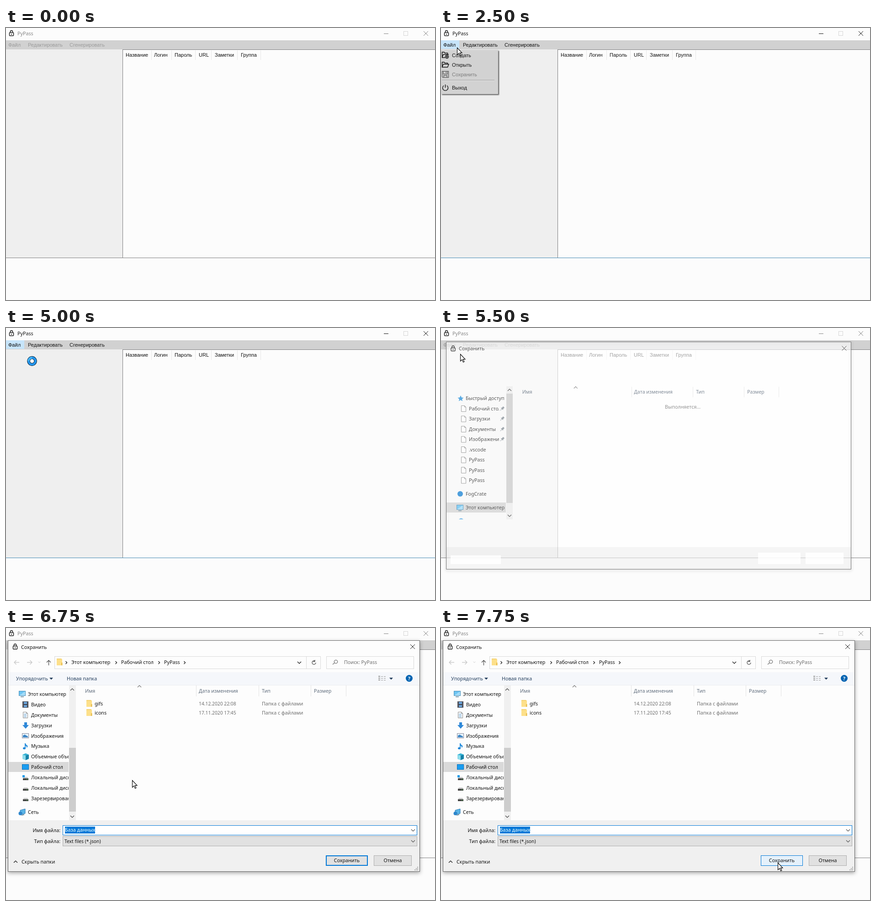
Recreate the animation shown at these times as an HTML page. Size 939 by 597 pixels, loop 8000 ms.

```html
<!DOCTYPE html>
<html lang="ru">
<head>
<meta charset="utf-8">
<title>PyPass</title>
<style>
html, body { margin: 0; width: 100%; height: 100%; overflow: hidden; background: #fcfcfc; }
svg { display: block; }
text { white-space: pre; fill: currentColor; }
.app { font: 11px "Liberation Sans", Arial, sans-serif; }
.ui { font: 10.7px "Noto Sans", "Open Sans", sans-serif; }
.tree { font-size: 10.5px; }
.latin { font-size: 10.3px; }
.line { fill: none; stroke: currentColor; }
.crisp { shape-rendering: crispEdges; }
.end { text-anchor: end; }
.mid { text-anchor: middle; }

.focus, .caption, .hover, .edge, .menu, .create, .ring, .opening, .dialog, .crumb, .pressable, .cursor {
  animation: 8s step-end infinite;
}
.focus { animation-name: focus; }
.caption { animation-name: caption; }
.hover { animation-name: hover; }
.edge { animation-name: edge; }
.menu { animation-name: menu; }
.create { animation-name: create; }
.ring { animation-name: ring; }
.opening { animation-name: opening; }
.dialog { animation-name: dialog; }
.crumb { animation-name: crumb; }
.pressable { animation-name: press; }
.cursor { animation-name: cursor; }

@keyframes focus { 0%, 65.625% { color: #9b9b9b } 28.125% { color: #111 } }
@keyframes caption { 0%, 65.625% { color: #858585 } 28.125% { color: #111 } }
@keyframes hover { 0%, 65.625% { fill: #d0d0d000 } 21.875% { fill: #deeef8 } 28.125% { fill: #c6e4fa } }
@keyframes edge { 0%, 65.625% { stroke: #7e7e80 } 28.125% { stroke: #4389b3 } }
@keyframes menu { 0%, 62.5% { opacity: 0 } 31.25% { opacity: 1 } }
@keyframes create { 0% { color: #111 } 43.75% { color: #f4f4f4 } }
@keyframes ring { 0%, 68.75% { opacity: 0 } 62.5% { opacity: 1 } }
@keyframes opening { 0%, 71.875% { opacity: 0 } 68.75% { opacity: 1 } }
@keyframes dialog { 0% { opacity: 0 } 71.875% { opacity: 1 } }
@keyframes crumb { 0% { opacity: 0 } 75% { opacity: 1 } }
@keyframes press {
  0% { fill: #e1e1e1; stroke: #0078d7 }
  90.625% { fill: #e5f1fb; stroke: #e5f1fb }
}
@keyframes cursor {
  0%, 62.5% { opacity: 0; transform: translate(315px, 471px) }
  9.375% { opacity: 1; transform: translate(315px, 471px) }
  12.5% { opacity: 1; transform: translate(170px, 256px) }
  15.625% { opacity: 1; transform: translate(104px, 141px) }
  18.75% { opacity: 1; transform: translate(49px, 67px) }
  21.875% { opacity: 1; transform: translate(32px, 43px) }
  28.125% { opacity: 1; transform: translate(35px, 43px) }
  37.5% { opacity: 1; transform: translate(31px, 38px) }
  40.625% { opacity: 1; transform: translate(36px, 50px) }
  43.75% { opacity: 1; transform: translate(32px, 53px) }
  46.875%, 68.75% { opacity: 1; transform: translate(42px, 57px) }
  78.125% { opacity: 1; transform: translate(100px, 96px) }
  81.25% { opacity: 1; transform: translate(187px, 215px) }
  84.375% { opacity: 1; transform: translate(276px, 334px) }
  87.5% { opacity: 1; transform: translate(560px, 440px) }
  90.625%, 100% { opacity: 1; transform: translate(737px, 515px) }
}
</style>
</head>
<body>
<svg width="939" height="597" viewBox="0 0 939 597">
<defs>
  <g id="lock" fill="none" stroke="#222" stroke-width="1.5">
    <rect x="1" y="5" width="9" height="7" rx="1.2"/>
    <path d="M3 5V3a2.5 2.5 0 0 1 5 0V5M5.500 7.500V10"/>
  </g>
  <path id="close" class="line" d="M0 0L10 10M10 0L0 10"/>
  <path id="down" class="line" d="M-4 -2L0 2L4 -2" stroke-width="1.2"/>
  <path id="up" class="line" d="M-4 2L0 -2L4 2" stroke-width="1.2"/>
  <path id="next" class="line" d="M-1.500 -3L1.500 0L-1.500 3" stroke-width="1.2"/>
  <path id="drop" d="M-4 -2H4L0 2.500Z"/>
  <g id="folder">
    <path d="M0 0H10L12 2V15H0Z" fill="#f5d374"/>
    <path d="M1 2H12V15H0V4Z" fill="#fde08a"/>
    <path d="M10 9H12.500V15H10Z" fill="#e9bd4e"/>
  </g>
  <g id="monitor">
    <rect x=".5" y=".5" width="14" height="10" fill="#6cc4f2" stroke="#4a8fb8"/>
    <path d="M1 10L14 1V10Z" fill="#a4dcf8"/>
    <path d="M4 13H11" stroke="#5b7f95" stroke-width="1.500"/>
  </g>
  <g id="drive">
    <path d="M2 0H10L12 3H0Z" fill="#ccc"/>
    <rect y="3" width="12" height="4" fill="#444"/>
    <path d="M8 5H10.500" stroke="#5fd35f"/>
  </g>
  <path id="page" d="M.5 .5H7.500L10.500 3.500V13.500H.5ZM7.500 .5V3.500H10.500" fill="#fff" stroke="#8d8d8d"/>
  <g id="pin" transform="rotate(45)" fill="#8b949c">
    <path d="M-2 -5H2V-1L3.500 1H-3.500L-2 -1ZM-.5 1H.5V6H-.5Z"/>
  </g>
  <g id="columns">
    <path class="crisp" d="M416.500 126V150M553.500 126V150M667.500 126V150M744.500 126V150" stroke="#e4e4e4"/>
    <use href="#up" x="292" y="128" color="#777"/>
    <text color="#5f6c7c"><tspan x="173" y="142">Имя</tspan><tspan x="422" y="142">Дата изменения</tspan><tspan x="560" y="142">Тип</tspan><tspan x="674" y="142">Размер</tspan></text>
  </g>
  <clipPath id="treeClip"><rect x="5" y="126" width="132" height="296"/></clipPath>
  <clipPath id="quickClip"><rect x="12" y="128" width="115" height="292"/></clipPath>
</defs>

<!-- main window -->
<g class="app">
  <rect width="939" height="597" fill="#fcfcfc"/>
  <g class="crisp">
    <rect y="27" width="939" height="20" fill="#d1d1d1"/>
    <rect y="47" width="255" height="458" fill="#efefef"/>
    <rect class="hover" y="27" width="40" height="19"/>
    <path class="line" d="M939 47.500H255.500V504" color="#7e7e80"/>
    <path class="edge" d="M0 504.500H939"/>
    <path d="M318.500 49V70M362.500 49V70M414.500 49V70M449.500 49V70M506.500 49V70M557.500 49V70" stroke="#e6e6e6"/>
  </g>
  <use href="#lock" x="6.500" y="5"/>
  <g class="caption">
    <text class="ui" x="25" y="16">PyPass</text>
    <path class="line crisp" d="M827 12.500H837"/>
    <use href="#close" x="914" y="7"/>
  </g>
  <rect class="crisp" x="870.500" y="7.500" width="9" height="9" fill="none" stroke="#d6d6d6"/>
  <text class="focus"><tspan x="5" y="41">Файл</tspan><tspan x="48" y="41">Редактировать</tspan><tspan x="139" y="41">Сгенерировать</tspan></text>
  <text color="#111"><tspan x="262" y="63">Название</tspan><tspan x="324" y="63">Логин</tspan><tspan x="369" y="63">Пароль</tspan><tspan x="422" y="63">URL</tspan><tspan x="457" y="63">Заметки</tspan><tspan x="514" y="63">Группа</tspan></text>
</g>

<!-- file menu -->
<g class="menu app" color="#111">
  <rect y="48" width="125" height="97" fill="#d2d2d2" style="filter: drop-shadow(2px 2px 1px #0009)"/>
  <text class="create" x="24" y="64">Создать</text>
  <text x="24" y="85">Открыть</text>
  <text x="24" y="106" color="#7d7d7d">Сохранить</text>
  <text x="24" y="135">Выход</text>
  <path class="crisp" d="M2 114.500H117" stroke="#999"/>
  <path class="crisp" d="M2 115.500H117" stroke="#eee"/>
  <g class="line" stroke-width="1.400">
    <path d="M9 65H2.500V53H7L8.500 55H14.500V58M2.500 65L5 58H17"/>
    <circle cx="13" cy="63" r="3.500"/>
    <path d="M11 63H15M13 61V65"/>
    <path d="M2.500 86V75H7L8.500 77H14.500V79.500M2.500 86L5 79.500H17L14.500 86Z"/>
    <path d="M2.500 95H16.500V108.500H4L2.500 107ZM5 95V101H14V95M6 108V104H13V108M11 96V99" stroke="#666"/>
    <path d="M6 126.500A6 6 0 1 0 13 126.500M9.500 124V131"/>
  </g>
</g>

<g class="ring" fill="none">
  <circle cx="57" cy="72.500" r="7.500" fill="#fff" stroke="#0c2a40" stroke-width="6.500"/>
  <circle cx="57" cy="72.500" r="7.500" stroke="#2496ee" stroke-width="4.600"/>
  <path d="M49.500 72.500A7.500 7.500 0 0 1 57 65" stroke="#43b4fa" stroke-width="4.400"/>
</g>

<!-- dialog fading in -->
<g class="opening ui">
  <path d="M11.500 30.500H897.500V529.500H11.500Z" fill="none" stroke="#777" style="filter: drop-shadow(0 2px 3px #0006)"/>
  <rect x="12" y="31" width="885" height="450" fill="#fff" opacity=".62"/>
  <rect x="12" y="481" width="885" height="48" fill="#f0f0f0" opacity=".62"/>
  <path d="M21 499H131V518H21ZM694 493H787V518H694ZM798 493H881V518H798Z" fill="#fff" opacity=".8"/>
  <g opacity=".8">
    <use href="#lock" x="21" y="38.500"/>
    <text x="39" y="49" color="#333">Сохранить</text>
    <use href="#close" x="877.500" y="39.500" color="#222"/>
    <use href="#columns" transform="translate(7.700 4.800) scale(.983)"/>
    <text class="mid" x="529" y="177" color="#777">Выполняется...</text>
    <rect x="12" y="383" width="130" height="22" fill="#d6d6d6"/>
    <rect x="143" y="128" width="14" height="292" fill="#eee"/>
    <rect x="143" y="144" width="14" height="240" fill="#cfcfcf"/>
    <use href="#up" x="150" y="136" color="#444"/>
    <use href="#down" x="150" y="412" color="#444"/>
    <path d="M43 148L45 152.500L49.500 153L46 156L47 160.500L43 158L39 160.500L40 156L36.500 153L41 152.500Z" fill="#3296dc"/>
    <use href="#page" x="44" y="170"/><use href="#page" x="44" y="192.500"/>
    <use href="#page" x="44" y="215"/><use href="#page" x="44" y="237.500"/>
    <use href="#page" x="44" y="260"/><use href="#page" x="44" y="282.500"/>
    <use href="#page" x="44" y="305"/><use href="#page" x="44" y="327.500"/>
    <use href="#pin" x="134" y="177"/><use href="#pin" x="134" y="199"/>
    <use href="#pin" x="134" y="222"/><use href="#pin" x="134" y="244"/>
    <circle cx="42" cy="364" r="6" fill="#2389d6"/>
    <use href="#monitor" x="34" y="388"/>
    <path d="M39 420Q44 415 49 420Z" fill="#52a9e6"/>
    <g color="#333">
      <text x="54" y="158">Быстрый доступ</text>
      <text clip-path="url(#quickClip)"><tspan x="61" y="181">Рабочий стол</tspan><tspan x="61" y="203">Загрузки</tspan><tspan x="61" y="226">Документы</tspan><tspan x="61" y="248">Изображения</tspan><tspan x="61" y="271">.vscode</tspan><tspan x="61" y="293">PyPass</tspan><tspan x="61" y="316">PyPass</tspan><tspan x="61" y="338">PyPass</tspan></text>
      <text><tspan x="54" y="368">FogCrate</tspan><tspan x="54" y="398">Этот компьютер</tspan></text>
    </g>
  </g>
</g>

<!-- save dialog -->
<g class="dialog ui" color="#111">
  <rect x="4.500" y="27.500" width="901" height="507" fill="#fdfdfd" stroke="#666" style="filter: drop-shadow(0 3px 4px #0005)"/>
  <rect x="5" y="97" width="900" height="28" fill="#f5f7fb"/>
  <path d="M5 125.500H905" stroke="#ebedf0"/>
  <rect x="5" y="422" width="900" height="112" fill="#f0f0f0"/>
  <use href="#lock" x="14.500" y="34.500"/>
  <text x="33" y="46">Сохранить</text>
  <use href="#close" x="885" y="36"/>

  <g class="line" stroke-width="1.300">
    <path d="M29 75.500H18M22.500 71L18 75.500L22.500 80M46 75.500H57M52.500 71L57 75.500L52.500 80" stroke="#c9c9c9"/>
    <path d="M93.500 82V71M89 75.500L93.500 71L98 75.500" stroke="#555"/>
    <path d="M106.500 62.500H688.500V89.500H106.500ZM657.500 62.500V89.500M701.500 62.500H892.500V89.500H701.500Z" class="crisp" stroke="#d9d9d9" stroke-width="1"/>
    <path d="M676 72.500A4 4 0 1 0 678 76M676 70V73.500H672.500" stroke="#555"/>
    <path d="M715 80L719 76.500" stroke="#777"/>
    <circle cx="722" cy="74" r="3.700" stroke="#777"/>
  </g>
  <use href="#down" x="73" y="75" transform="translate(29.200 30) scale(.6)" color="#bbb"/>
  <use href="#folder" x="111" y="67"/>
  <use href="#next" x="132" y="76"/><use href="#next" x="241" y="76"/><use href="#next" x="335" y="76"/>
  <use class="crumb" href="#next" x="391" y="76"/>
  <use href="#down" x="642" y="76"/>
  <text><tspan x="143" y="79">Этот компьютер</tspan><tspan x="252" y="79">Рабочий стол</tspan><tspan x="346" y="79">PyPass</tspan></text>
  <text x="740" y="79" color="#6d6d6d">Поиск: PyPass</text>

  <g color="#26405f">
    <text><tspan x="22" y="115">Упорядочить</tspan><tspan x="133" y="115">Новая папка</tspan></text>
    <use href="#drop" x="99" y="111" fill="#26405f"/>
    <use href="#drop" x="843" y="111" fill="#26405f"/>
  </g>
  <g class="crisp" fill="none" stroke="#999">
    <path d="M815 106H819M815 110H819M815 114H819" stroke-width="2"/>
    <path d="M821 106H825M827 106H831M821 110H825M827 110H831M821 114H825M827 114H831"/>
  </g>
  <circle cx="882.500" cy="110.500" r="7.500" fill="#0063b1"/>
  <text class="mid" x="882.500" y="115" color="#fff" font-weight="700">?</text>

  <use href="#columns"/>
  <use href="#folder" x="176" y="158"/>
  <use href="#folder" x="176" y="178"/>
  <text><tspan x="194" y="170">gifs</tspan><tspan x="194" y="190">icons</tspan></text>
  <text color="#6d6d6d"><tspan class="latin" x="422" y="170">14.12.2020 22:08</tspan><tspan class="latin" x="422" y="190">17.11.2020 17:45</tspan><tspan x="560" y="170">Папка с файлами</tspan><tspan x="560" y="190">Папка с файлами</tspan></text>

  <rect x="5" y="294" width="132" height="22" fill="#d9d9d9"/>
  <rect x="138" y="126" width="15" height="296" fill="#f0f0f0"/>
  <rect x="138" y="263" width="15" height="140" fill="#cdcdcd"/>
  <use href="#up" x="145" y="135" color="#444"/>
  <use href="#down" x="145" y="414" color="#444"/>
  <text class="tree" clip-path="url(#treeClip)"><tspan x="48" y="149">Этот компьютер</tspan><tspan x="55" y="172">Видео</tspan><tspan x="55" y="195">Документы</tspan><tspan x="55" y="218">Загрузки</tspan><tspan x="55" y="241">Изображения</tspan><tspan x="55" y="263">Музыка</tspan><tspan x="55" y="286">Объемные объекты</tspan><tspan x="55" y="309">Рабочий стол</tspan><tspan x="55" y="332">Локальный диск</tspan><tspan x="55" y="355">Локальный диск</tspan><tspan x="55" y="378">Зарезервировано</tspan><tspan x="48" y="408">Сеть</tspan></text>
  <use href="#monitor" x="28" y="138"/>
  <rect x="36" y="161" width="13" height="14" fill="#3b3b44"/>
  <path d="M39 162H46V167H39ZM39 169H46V174H39Z" fill="#6ba3d8"/>
  <path d="M37.500 162V175M47.500 162V175" stroke="#ddd" stroke-dasharray="1 2"/>
  <use href="#page" x="37" y="184"/>
  <path d="M39 189H45M39 192H45M39 195H45" stroke="#4a90c8"/>
  <path d="M40 207H46V213H50L43 221L36 213H40Z" fill="#2f88d8"/>
  <rect x="35.500" y="231.500" width="14" height="10" fill="#e8f4fc" stroke="#889"/>
  <path d="M37 240V236L41 234L48 238V240Z" fill="#3d85c4"/>
  <path d="M42 253V263" stroke="#1a86d9" stroke-width="1.800"/>
  <path d="M42 252Q43 256 47 258Q48 261 45 263Q46 259 42 258Z" fill="#1a86d9"/>
  <ellipse cx="40" cy="264" rx="3" ry="2.300" fill="#1a86d9"/>
  <path d="M36 278L43 275L50 278V287L43 290L36 287Z" fill="#36b2d4"/>
  <path d="M36 278L43 280V290L36 287Z" fill="#8ddcec"/>
  <path d="M43 280L50 278V287L43 290Z" fill="#1782a8"/>
  <rect x="35.500" y="299.500" width="14" height="11" fill="#1b9df0" stroke="#0c70b8"/>
  <use href="#drive" x="37" y="327"/>
  <rect x="36" y="323" width="5" height="5" fill="#1a9be8"/>
  <use href="#drive" x="37" y="350"/>
  <use href="#drive" x="37" y="373"/>
  <path d="M31 400L42 397V407L31 410Z" fill="#5ab4e6" stroke="#2a78b0"/>
  <circle cx="31.500" cy="407" r="4" fill="#2d86cc"/>
  <path d="M34 411L40 409.500" stroke="#5b7f95" stroke-width="1.500"/>

  <text class="end"><tspan x="119" y="448">Имя файла:</tspan><tspan x="119" y="472">Тип файла:</tspan></text>
  <g class="crisp">
    <rect x="124.500" y="433.500" width="775" height="21" fill="#fff" stroke="#0078d7"/>
    <rect x="124.500" y="457.500" width="775" height="21" fill="#e1e1e1" stroke="#adadad"/>
    <rect x="129" y="436" width="66" height="15" fill="#0078d7"/>
  </g>
  <text x="129" y="447" color="#fff">База данных</text>
  <text class="latin" x="128" y="472">Text files (*.json)</text>
  <use href="#down" x="891" y="444" color="#555"/>
  <use href="#down" x="891" y="468" color="#555"/>
  <use href="#up" x="21" y="513"/>
  <text x="34" y="517">Скрыть папки</text>
  <g class="crisp">
    <rect x="700.500" y="499.500" width="91" height="22" fill="none" stroke="#0078d7"/>
    <rect class="pressable" x="701.500" y="500.500" width="89" height="20"/>
    <rect x="805.500" y="499.500" width="82" height="22" fill="#e1e1e1" stroke="#adadad"/>
  </g>
  <text class="mid"><tspan x="746" y="514">Сохранить</tspan></text>
  <text class="mid"><tspan x="846.500" y="514">Отмена</tspan></text>
  <path d="M900 525h2M897 528h2M900 528h2M894 531h2M897 531h2M900 531h2" stroke="#aaa" stroke-width="2"/>
</g>

<g class="cursor">
  <path d="M.5 .5V15.800L4 12.500L6.600 18L8.900 17L6.400 11.600H11Z" fill="#fff" stroke="#000" stroke-width="1.100"/>
</g>
</svg>
</body>
</html>
```
